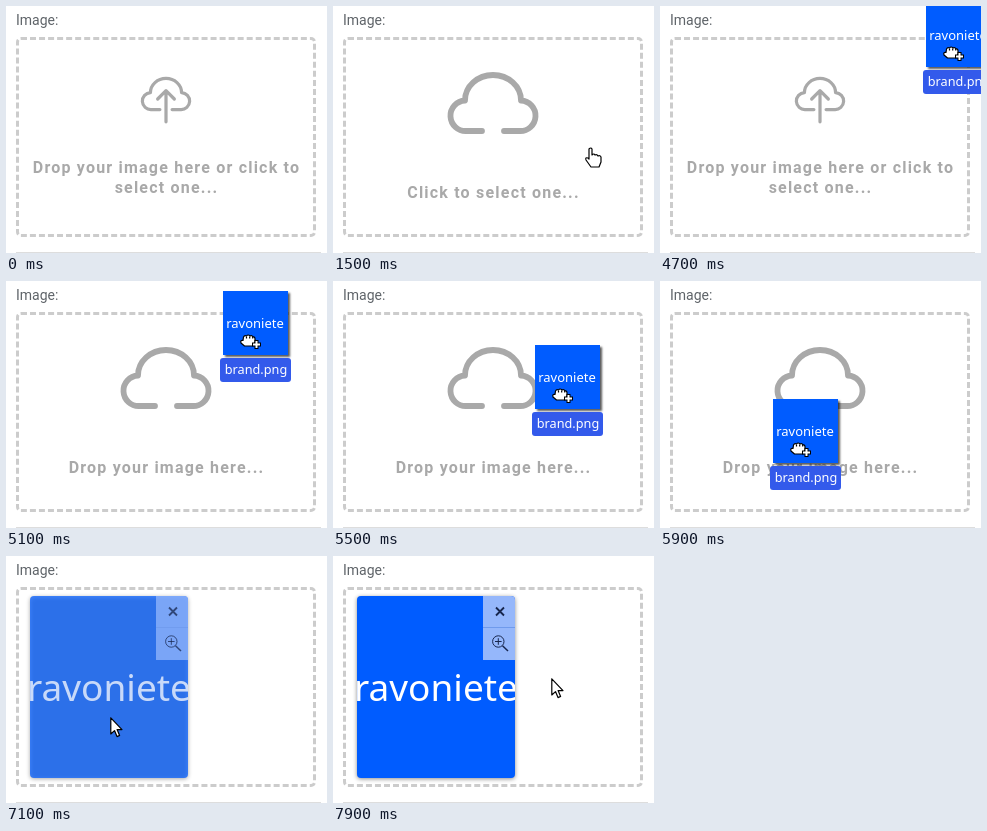
Recreate the animation shown at these times as an HTML page with a canvas. Size 321 px wide and 247 px high, loop 8 s.

```html
<!DOCTYPE html>
<html lang="en">
<head>
<meta charset="utf-8">
<title>Image drop zone</title>
<style>
  html, body { margin: 0; width: 100%; height: 100%; overflow: hidden; background: #fff; }
  #zone {
    position: absolute; left: 10px; top: 31px; width: 300px; height: 200px;
    box-sizing: border-box; border: 3px dashed #ccc; border-radius: 5px;
  }
  canvas { position: absolute; left: 0; top: 0; width: 321px; height: 247px; }
</style>
</head>
<body>
<div id="zone"></div>
<canvas id="stage"></canvas>
<script>
const W = 321, H = 247, LOOP = 8000, STEP = 100;
const GREY = '#a9a9a9', BLUE = '#005cff', BRAND = 'ravoniete';
const UI = 'Roboto, sans-serif', LOGO = '"Noto Sans", sans-serif';
const canvas = document.getElementById('stage');
const ctx = canvas.getContext('2d');
const dpr = window.devicePixelRatio || 1;
canvas.width = W * dpr;
canvas.height = H * dpr;

// Waypoints: [time, x, y]
const pointerIn = [[1200, 313, 132], [1300, 292, 136], [1500, 256, 142], [1700, 240, 144]];
const pointerOut = [[2000, 244, 144], [2200, 276, 140], [2400, 313, 132]];
const dragPath = [[4700, 266, -3], [4900, 240, 0], [5100, 217, 10], [5300, 210, 36],
  [5500, 202, 64], [5700, 158, 98], [5900, 113, 118], [6150, 90, 118], [6400, 79, 117]];
const mousePath = [[7200, 104, 161], [7500, 100, 178], [7600, 148, 212],
  [7700, 232, 217], [7800, 276, 168], [7900, 218, 122]];

const clamp = v => Math.max(0, Math.min(1, v));
const ease = (t, from, to) => {
  const p = clamp((t - from) / (to - from));
  return p * p * (3 - 2 * p);
};

function along(path, t) {
  const last = path.length - 1;
  if (t <= path[0][0]) return path[0].slice(1);
  if (t >= path[last][0]) return path[last].slice(1);
  const i = path.findIndex(p => p[0] > t);
  const [t0, x0, y0] = path[i - 1], [t1, x1, y1] = path[i];
  const p = (t - t0) / (t1 - t0);
  return [Math.round(x0 + (x1 - x0) * p), Math.round(y0 + (y1 - y0) * p)];
}

function text(str, x, y, font, color, { align = 'center', spacing = 0 } = {}) {
  ctx.font = font;
  ctx.fillStyle = color;
  ctx.textAlign = align;
  ctx.letterSpacing = spacing + 'px';
  ctx.fillText(str, x, y);
  ctx.letterSpacing = '0px';
}

function box(x, y, w, h, r, color) {
  ctx.fillStyle = color;
  ctx.beginPath();
  ctx.roundRect(x, y, w, h, r);
  ctx.fill();
}

function at(x, y, draw) {
  ctx.save();
  ctx.translate(x, y);
  draw();
  ctx.restore();
}

function outlined(d) {
  const path = new Path2D(d);
  ctx.fillStyle = '#fff';
  ctx.strokeStyle = '#000';
  ctx.lineWidth = 1.2;
  ctx.lineJoin = 'round';
  ctx.fill(path);
  ctx.stroke(path);
}

const cloud = new Path2D('M-11 28H-26.5A15 15 0 0 1-28-2.5A28 25.5 0 0 1 28-2.5A15 15 0 0 1 26.5 28H11');
const arrow = new Path2D('M0-5V50M-15 9L0-6L15 9');

function drawCloud(grow, lift, arrowAlpha) {
  at(160, 88 + 9 * grow, () => {
    const s = (1 + 0.8 * grow) / 1.8;
    ctx.scale(s, s);
    ctx.strokeStyle = GREY;
    ctx.lineWidth = 5.8;
    ctx.lineCap = ctx.lineJoin = 'round';
    ctx.stroke(cloud);
    ctx.globalAlpha *= arrowAlpha;
    ctx.translate(0, lift);
    ctx.stroke(arrow);
  });
}

function drawPrompt(t) {
  const hover = t >= 1300 && t < 2400;
  const drag = t >= 4800;
  const grow = drag ? ease(t, 4700, 4900) : ease(t, 1200, 1400) - ease(t, 2300, 2500);
  const rise = ease(t, 6450, 7000);
  const rising = t > 6400;
  drawCloud(grow, rising ? 24 * (1 - rise) : -14 * grow, rising ? rise : 1 - grow);

  const line = (str, y) => text(str, 160.5, y, 'bold 16px ' + UI, GREY, { spacing: 1.2 });
  if (drag) line('Drop your image here...', 192);
  else if (hover) line('Click to select one...', 192);
  else {
    line('Drop your image here or click to', 167);
    line('select one...', 187);
  }
}

function drawPointer(x, y) {
  at(x, y, () => outlined('M0 1Q2-1 3 1V7Q5 5 6 7Q8 6 9 8Q11 7 12 9V14L10 19H2L-3 12Q-4 9-1 10L0 11Z'));
}

function drawArrowCursor(x, y) {
  at(x, y, () => outlined('M.8.8V17L4.5 13.6L7 19.6L9.6 18.4L7.1 12.6H12Z'));
}

function drawGrab(x, y) {
  at(x, y, () => {
    outlined('M3.5 3Q4.5 1 6.5 2Q8 0 10 2Q12 1 13 3Q15 2.5 15 5V8L13 12H4.5L1 9Q0 6 3 6.5Z');
    ctx.beginPath();
    for (const px of [6.5, 9.7, 12.7]) { ctx.moveTo(px, 2.5); ctx.lineTo(px, 4.5); }
    ctx.stroke();
    ctx.fillStyle = '#000';
    ctx.fillRect(14.5, 6, 4, 9);
    ctx.fillRect(12, 8.5, 9, 4);
    ctx.fillStyle = '#fff';
    ctx.fillRect(15.5, 7, 2, 7);
    ctx.fillRect(13, 9.5, 7, 2);
  });
}

function drawFile(x, y) {
  at(x, y, () => {
    ctx.save();
    ctx.shadowColor = 'rgba(0,0,0,.65)';
    ctx.shadowBlur = 2 * dpr;
    ctx.shadowOffsetX = ctx.shadowOffsetY = 1.5 * dpr;
    box(0, 0, 65, 64, 0, BLUE);
    ctx.restore();
    text(BRAND, 32, 37, '13px ' + LOGO, '#fff');
    box(-3, 67, 71, 24, 3, '#335aeb');
    text('brand.png', 33, 83, '12.7px ' + LOGO, '#fff');
    drawGrab(17, 43);
  });
}

function drawButtons() {
  box(150, 40, 32, 64, [0, 4, 0, 0], '#95b7fb');
  ctx.fillStyle = '#6f9aec';
  ctx.fillRect(150, 71, 32, 1);
  ctx.strokeStyle = '#17264d';
  ctx.lineCap = 'butt';
  ctx.lineWidth = 1.8;
  ctx.stroke(new Path2D('M163 51.5L171 59.5M171 51.5L163 59.5'));
  ctx.lineWidth = 1;
  ctx.stroke(new Path2D('M171 85.5A5.7 5.7 0 1 1 159.6 85.5A5.7 5.7 0 1 1 171 85.5M162 85.5H168.6M165.3 82.2V88.8'));
  ctx.lineWidth = 1.5;
  ctx.stroke(new Path2D('M169.5 89.7L175 95'));
}

function drawPreview() {
  ctx.save();
  ctx.shadowColor = 'rgba(0,0,0,.45)';
  ctx.shadowBlur = 4 * dpr;
  ctx.shadowOffsetY = dpr;
  box(24, 40, 158, 182, 4, BLUE);
  ctx.restore();
  ctx.save();
  ctx.beginPath();
  ctx.roundRect(24, 40, 158, 182, 4);
  ctx.clip();
  text(BRAND, 103, 145, '37px ' + LOGO, '#fff');
  ctx.restore();
  drawButtons();
}

function render(now) {
  const t = Math.floor(now % LOOP / STEP) * STEP;
  ctx.setTransform(dpr, 0, 0, dpr, 0, 0);
  ctx.clearRect(0, 0, W, H);
  text('Image:', 10, 19, '14px ' + UI, '#5f6469', { align: 'left' });
  ctx.fillStyle = '#ddd';
  ctx.fillRect(10, 246, 305, 1);

  if (t < 7000) drawPrompt(t);
  else {
    ctx.globalAlpha = ease(t, 6900, 7200);
    drawPreview();
    ctx.globalAlpha = 1;
    drawArrowCursor(...along(mousePath, t));
  }
  if (t >= 1200 && t < 2500) drawPointer(...along(t < 2000 ? pointerIn : pointerOut, t));
  if (t >= 4700 && t < 7000) drawFile(...along(dragPath, t));
}

const start = performance.now();
function tick() {
  render(performance.now() - start);
  requestAnimationFrame(tick);
}
tick();
</script>
</body>
</html>
```
